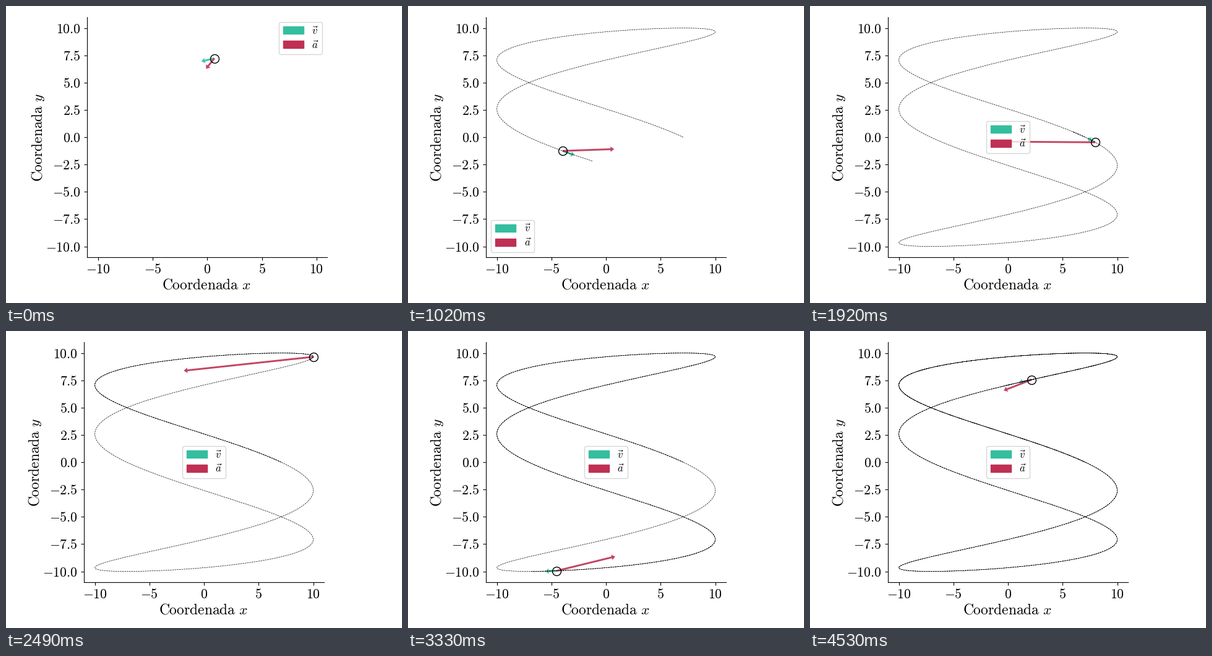
A matplotlib script that plays this animation: 640x480 px, repeating every 4560 ms.

```python
import numpy as np
import matplotlib.pyplot as plt
from matplotlib.animation import FuncAnimation
from matplotlib.patches import FancyBboxPatch, Rectangle
from matplotlib.transforms import Affine2D

W, H, DPI = 640, 480, 100
FRAMES, INTERVAL = 152, 30
STEP = 0.099            # curve parameter advanced per frame
SUB = 33                # curve samples per frame
WRAP = 15 - STEP        # where the marker sits before the path begins
SIDE, TOP = 388.2, 18.0  # plot square, in pixels
LEFT_FIRST, LEFT = 131.2, 126.0
GREEN, RED = "#34be9f", "#bf3053"

plt.rcParams["mathtext.fontset"] = "cm"


def position(t):
    return np.array([10 * np.cos(3 * t + np.pi / 4), 10 * np.sin(t)])


def velocity(t):
    return np.array([-30 * np.sin(3 * t + np.pi / 4), 10 * np.cos(t)])


def acceleration(t):
    return np.array([-90 * np.cos(3 * t + np.pi / 4), -10 * np.sin(t)])


fig = plt.figure(figsize=(W / DPI, H / DPI), dpi=DPI, facecolor="white")
ax = fig.add_axes([0, 0, 1, 1])


def place_axes(left):
    ax.set_position([left / W, 1 - (TOP + SIDE) / H, SIDE / W, SIDE / H])


def setup_axes():
    ax.set_xlim(-11, 11)
    ax.set_ylim(-11, 11)
    ax.spines[["top", "right"]].set_visible(False)
    ax.set_xticks(np.arange(-10, 11, 5))
    ax.set_yticks(np.arange(-10, 10.1, 2.5))
    ax.xaxis.set_major_formatter(lambda v, _: f"${v:g}$")
    ax.yaxis.set_major_formatter(lambda v, _: f"${v:.1f}$")
    ax.tick_params(labelsize=15.7)
    ax.tick_params(axis="y", pad=4)
    ax.set_xlabel(r"$\mathrm{Coordenada}\ x$", fontsize=16.9, va="baseline")
    ax.set_ylabel(r"$\mathrm{Coordenada}\ y$", fontsize=16.9, va="baseline")
    ax.xaxis.set_label_coords(0.496, -0.131)
    ax.yaxis.set_label_coords(-0.1855, 0.5)


def make_arrow(vector, color):
    # Lengths are relative to the vector at the wrapped start
    u, v = vector(WRAP)
    x, y = position(WRAP)
    return ax.quiver([x], [y], [u], [v], color=color, alpha=0.9,
                     scale=18 * np.hypot(u, v), width=0.0075,
                     headwidth=3, headlength=2, headaxislength=2, zorder=1)


def make_legend():
    """Legend in y-down pixels; the returned transform moves it."""
    move = Affine2D()
    px = move + Affine2D().scale(1 / W, -1 / H).translate(0, 1) + fig.transFigure
    ax.add_patch(FancyBboxPatch(
        (0, 0), 70, 51.8, boxstyle="round,pad=0,rounding_size=3.33",
        fc="white", ec="0.8", lw=1, alpha=0.8, snap=True,
        transform=px, clip_on=False, zorder=5))
    rows = [(0, GREEN, r"$\vec{v}$"), (23, RED, r"$\vec{a}$")]
    for dy, color, label in rows:
        ax.add_patch(Rectangle((6.67, 6.9 + dy), 33.3, 12.2, fc=color,
                               ec=color, lw=1, transform=px, clip_on=False,
                               zorder=6))
        ax.text(53.3, 19.3 + dy, label, fontsize=12, transform=px,
                va="baseline", zorder=6)
    return move


setup_axes()
arrows = [(make_arrow(velocity, GREEN), velocity),
          (make_arrow(acceleration, RED), acceleration)]
path, = ax.plot([], [], "k--", lw=0.5)
marker, = ax.plot([], [], "ko", ms=10, mfc="none", mew=1)
legend_move = make_legend()
curve = position(np.arange(FRAMES * SUB) * STEP / SUB)


def legend_corner(n, left):
    """Top-left pixel of the legend, which avoids the growing path."""
    if n < 16:
        return left + SIDE - 78.3, 26.3
    if n < 48:
        return left + 8.3, 346.1
    return left + (SIDE - 70) / 2, 186.2


def update(n):
    left = LEFT if n else LEFT_FIRST
    place_axes(left)
    t = STEP * (n - 1) if n else WRAP
    x, y = position(t)
    path.set_data(*curve[:, :n * SUB])
    marker.set_data([x], [y])
    for arrow, vector in arrows:
        u, v = vector(t)
        arrow.set_offsets([[x, y]])
        arrow.set_UVC([u], [v])
    legend_move.clear().translate(*legend_corner(n, left))
    return []


anim = FuncAnimation(fig, update, frames=FRAMES, interval=INTERVAL,
                     repeat=True, repeat_delay=0, blit=False)
plt.show()
```
